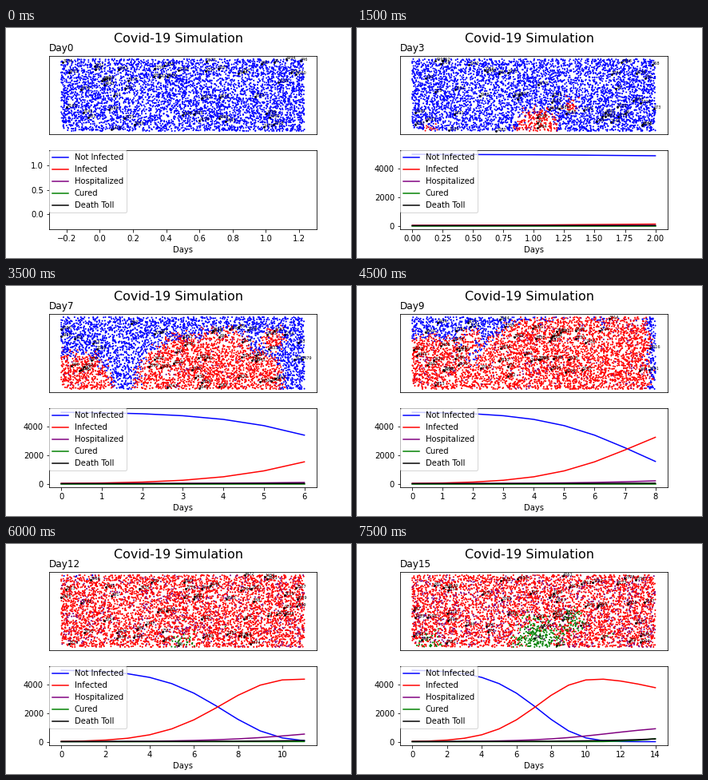
Recreate the animation shown at these times as a matplotlib script. Size 432 px wide and 288 px high, loop 8000 ms.

```python
import numpy as np
import matplotlib.pyplot as plt
from matplotlib.animation import FuncAnimation

N = 5000
DAYS = 16
W, H = 305, 90
SPEED = 10
TRAVELLERS = 50

plt.rcParams.update({"font.family": "DejaVu Sans", "font.size": 10})

# Daily totals: a slowing exponential outbreak and what follows from it
days = np.arange(DAYS)
caught = N * (1 - np.exp(-np.exp(-5.26 + 0.85 * days - 0.0216 * days**2)))
hospital = 1165 / (1 + np.exp(0.47 * (11.4 - days)))
cured = 5.5 * np.maximum(days - 10, 0) ** 2.6
deaths = 3.3 * np.exp(0.29 * days)
infected = np.maximum(caught - 0.95 * (hospital + deaths) - cured, 0)

SERIES = [("Not Infected", "blue", N - caught),
          ("Infected", "red", infected),
          ("Hospitalized", "purple", hospital),
          ("Cured", "green", cured),
          ("Death Toll", "black", deaths)]

# Outbreak centres: x, y, starting day
CENTRES = [(156, 2, 0), (201, 30, 1.9), (21, 1, 2),
           (246, 14, 3.2), (265, 62, 5), (70, 60, 7)]


def ranks(values):
    return np.argsort(np.argsort(values))


rng = np.random.default_rng(19)
home = rng.random((N, 2)) * (W, H)
arrival = np.min([t + np.hypot(home[:, 0] - x, home[:, 1] - y) / SPEED
                  for x, y, t in CENTRES], axis=0)
infect_rank = ranks(arrival + rng.normal(0, 0.4, N))
cure_rank = ranks(arrival + rng.normal(0, 0.9, N))
severity = rng.random(N)

fig, (field, chart) = plt.subplots(2, 1, figsize=(6, 4), dpi=72)
fig.subplots_adjust(left=0.125, right=0.9, bottom=0.125, top=0.88, hspace=0.2)
fig.suptitle("Covid-19 Simulation", fontsize=16)

field.set(xlim=(-0.05 * W, 1.05 * W), ylim=(-0.05 * H, 1.05 * H),
          xticks=[], yticks=[])
dots = field.scatter(*home.T, s=1, c="blue")
marks = field.scatter([], [], s=3, c="black")
tags = [field.text(0, 0, "", fontsize=5) for _ in range(TRAVELLERS)]

lines = [chart.plot([], [], color=color, label=name)[0]
         for name, color, _ in SERIES]
chart.set_xlabel("Days")
chart.legend(loc="upper left", bbox_to_anchor=(0, 1), borderaxespad=0)


def person_colors(day):
    colors = np.full(N, "blue", dtype="<U6")
    if day:
        sick = infect_rank < caught[day]
        colors[sick] = "red"
        colors[sick & (severity < hospital[day] / caught[day])] = "purple"
        colors[cure_rank < cured[day]] = "green"
    return colors


def draw(day):
    step = np.random.default_rng(100 + day)
    pos = np.clip(home + step.normal(0, 1, (N, 2)), 0, (W, H))
    dots.set_offsets(pos)
    dots.set_color(person_colors(day))

    chosen = step.choice(N, TRAVELLERS, replace=False)
    marks.set_offsets(pos[chosen])
    for tag, i in zip(tags, chosen):
        tag.set_position(pos[i])
        tag.set_text(str(i))

    field.set_title(f"Day{day}", loc="left")
    for line, (_, _, totals) in zip(lines, SERIES):
        line.set_data(days[:day], totals[:day])
    if day:
        last = day - 1
        pad = 0.05 * last or 0.055
        chart.set(xlim=(-pad, last + pad), ylim=(-0.05 * N, 1.05 * N))
    else:
        chart.set(xlim=(-0.305, 1.305), ylim=(-0.305, 1.305))
    return [dots, marks, *tags, *lines]


anim = FuncAnimation(fig, draw, frames=DAYS, interval=500, repeat=True,
                     repeat_delay=0, init_func=lambda: draw(0), blit=False)
plt.show()
```
